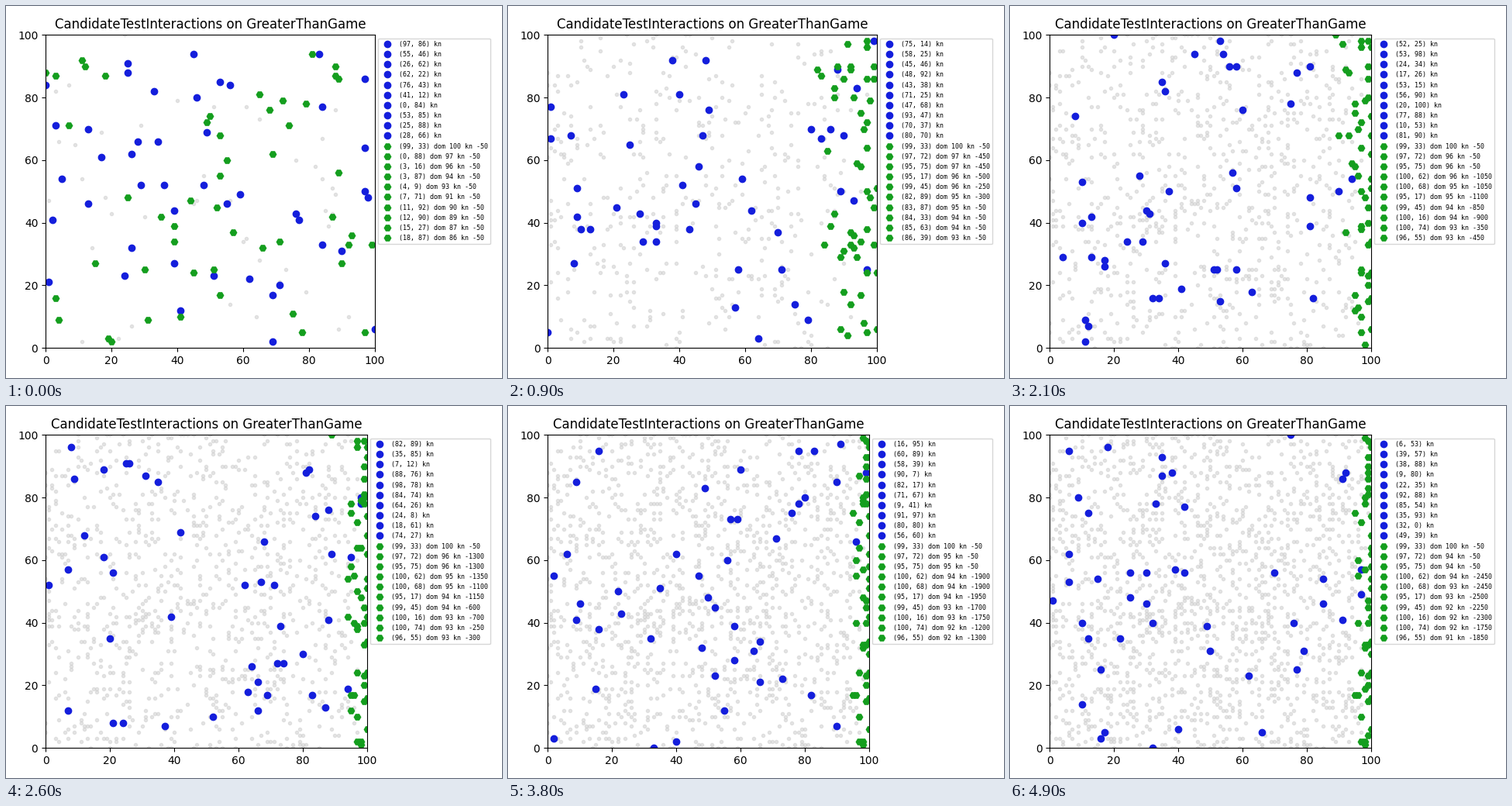
Animation of 640x480 px, one loop 5 s. Source, as a matplotlib script:

```python
import random

import matplotlib.pyplot as plt
from matplotlib.animation import FuncAnimation

FRAMES, INTERVAL = 50, 100
N_TESTS, N_CANDIDATES = 50, 45
BLUE, GREEN, GREY = "#141edc", "#149e1e", "0.8"

# Leading tests in order of rank, with the generation that finds them.
ELITE = [((99, 33), 0), ((97, 72), 4), ((95, 75), 1), ((100, 62), 12), ((100, 68), 20),
         ((95, 17), 1), ((99, 45), 1), ((100, 16), 10), ((100, 74), 12), ((96, 55), 12)]
# Generations each veteran's penalty lags behind the clock.
LAGS = [1, 1, 0, 5, 4, 15, 13, 22, 21]

rng = random.Random(12)


def random_point():
    return rng.randint(0, 100), rng.randint(0, 100)


def found_elite(gen):
    return [point for point, found in ELITE if found <= gen]


def select_tests(gen, pool, luck):
    """Keep the tests with the greatest x; luck matters less as time goes on."""
    spread = 1 + 30 / (gen + 1)
    elite = found_elite(gen)
    ranked = sorted(pool.difference(elite),
                    key=lambda p: p[0] + spread * luck[p], reverse=True)
    return elite + ranked[:N_TESTS - len(elite)]


def propose_candidates(gen, tests, seen):
    """Mostly new points, with more and more repeats of old ones."""
    fresh = 0.9 - 0.4 * gen / FRAMES
    old = sorted(seen)
    candidates = []
    while len(candidates) < N_CANDIDATES:
        point = random_point() if rng.random() < fresh else rng.choice(old)
        if point not in candidates and point not in tests:
            candidates.append(point)
    return candidates


def test_labels(gen, tests):
    elite = found_elite(gen)
    rows = (elite + sorted(set(tests).difference(elite)))[:10]
    newcomers = rng.choice((1, 1, 2, 3))
    ages = [1] * newcomers + [max(1, gen + 1 - lag) for lag in LAGS]
    top = 98.4 - 3.5 * gen / (FRAMES - 1)
    slope = 0.4 + 1 / (gen + 1)
    labels = []
    for rank, ((x, y), age) in enumerate(zip(rows, ages)):
        dominated = round(top - slope * rank) if rank else 100
        labels.append(f"({x}, {y}) dom {dominated} kn {-50 * age}")
    return labels


def evolve():
    seen = {random_point() for _ in range(N_TESTS)}
    luck, history = {}, []
    for gen in range(FRAMES):
        for point in sorted(seen):
            luck.setdefault(point, rng.gauss(0, 1))
        if gen:
            tests = select_tests(gen, seen, luck)
        else:
            tests = found_elite(0) + [random_point() for _ in range(N_TESTS - 1)]
        candidates = propose_candidates(gen, tests, seen)
        current = set(tests) | set(candidates)
        labels = [f"({x}, {y}) kn" for x, y in candidates[:10]]
        labels += test_labels(gen, tests)
        history.append((sorted(seen - current), candidates, tests, labels))
        seen |= current
    return history


history = evolve()

fig, ax = plt.subplots(figsize=(6.4, 4.8), dpi=100)
ax.set_title("CandidateTestInteractions on GreaterThanGame")
ax.set_xlim(0, 100)
ax.set_ylim(0, 100)
grey_dots, = ax.plot([], [], ".", color=GREY, alpha=0.5)
blue_dots, = ax.plot([], [], "o", color=BLUE)
green_dots, = ax.plot([], [], "H", color=GREEN)
layers = grey_dots, blue_dots, green_dots


def draw(gen):
    *clouds, labels = history[gen]
    for layer, cloud in zip(layers, clouds):
        layer.set_data(*zip(*cloud))
    ax.legend([blue_dots] * 10 + [green_dots] * 10, labels, loc="upper left",
              bbox_to_anchor=(1, 1), prop={"family": "DejaVu Sans Mono", "size": 6})
    fig.tight_layout()
    return layers


anim = FuncAnimation(fig, draw, frames=FRAMES, interval=INTERVAL,
                     repeat=True, repeat_delay=0)
plt.show()
```
